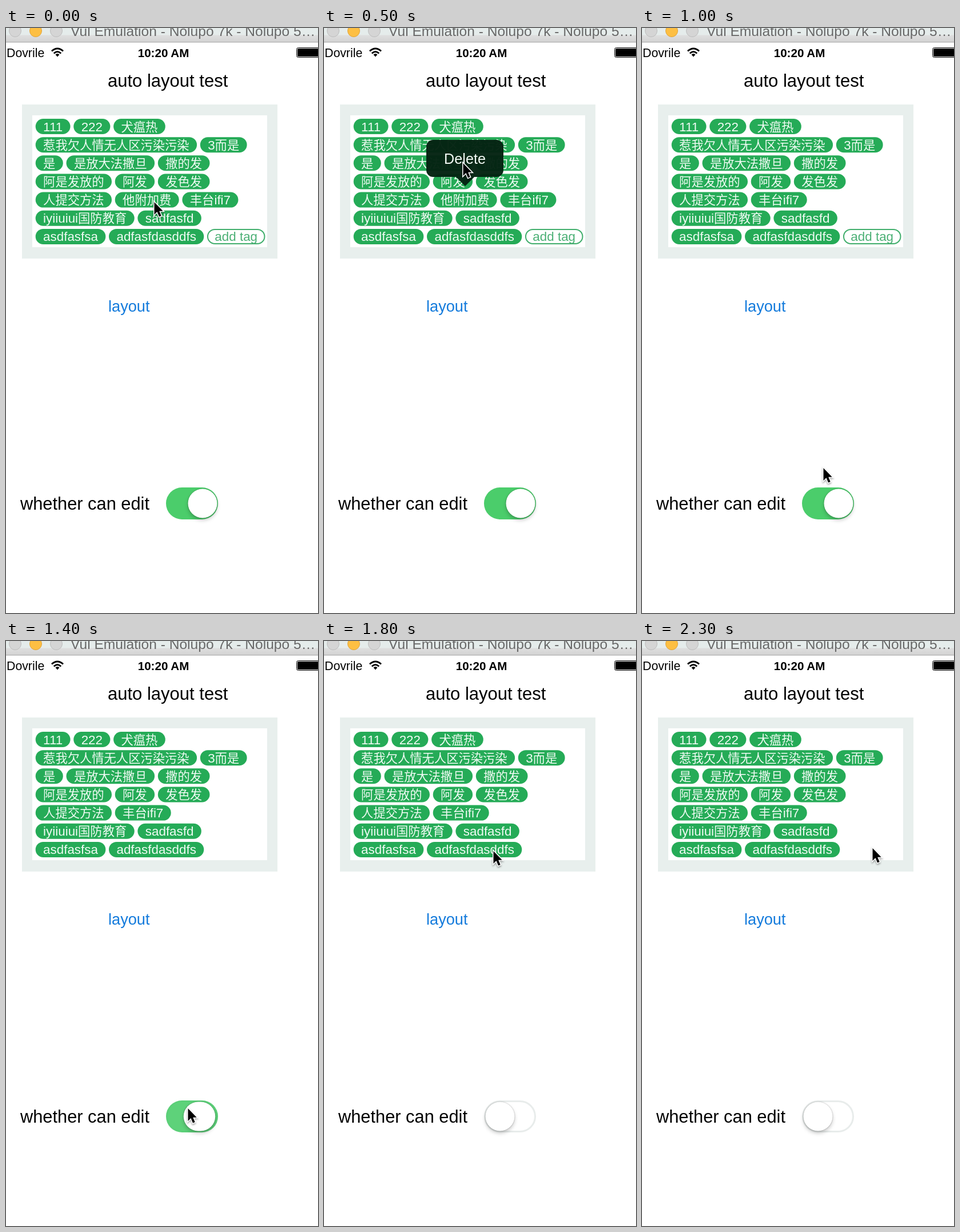
Recreate the animation shown at these times as an HTML page. Size 546x1025 px, loop 2.4 s.

```html
<!DOCTYPE html>
<html lang="en">
<head>
<meta charset="utf-8">
<title>Tag list</title>
<style>
  html, body { margin: 0; width: 100%; height: 100%; overflow: hidden; background: #fff; }
  svg { display: block; width: 546px; height: 1025px; font-family: "Liberation Sans", "Noto Sans CJK SC", "Noto Sans CJK", sans-serif; }
  .han { font-family: "Noto Sans CJK SC", "Noto Sans CJK", sans-serif; font-size: 21.3px; font-weight: 300; }
  #tags text { font-size: 22.4px; text-anchor: middle; fill: #effbf3; }
  #tags rect { fill: #25ab57; }
  #tags .add rect { fill: #fff; stroke: #41ae6c; stroke-width: 2; }
  #tags .add text { fill: #4bb075; }
  #knob { fill: #fff; filter: drop-shadow(0 0 1px rgba(0, 0, 0, .3)) drop-shadow(0 4px 3px rgba(0, 0, 0, .2)); }
  #cursor { stroke: #fff; stroke-width: 3; paint-order: stroke; filter: drop-shadow(0 2px 1.5px rgba(0, 0, 0, .35)); }
</style>
</head>
<body>
<svg viewBox="0 0 546 1025">
  <defs>
    <linearGradient id="bar" x2="0" y2="1">
      <stop offset=".48" stop-color="#e5eceb"/>
      <stop offset=".55" stop-color="#dedede"/>
      <stop offset="1" stop-color="#d3d3d3"/>
    </linearGradient>
  </defs>

  <rect width="546" height="24" fill="url(#bar)"/>
  <rect y="24" width="546" height="1.5" fill="#b6b6b6"/>
  <g fill="#d5d5d5" stroke="#bdbdbd">
    <circle cx="16" cy="5" r="10.5"/>
    <circle cx="52" cy="5" r="10.5" fill="#fdbf43" stroke="#e0a43a"/>
    <circle cx="88" cy="5" r="10.5"/>
  </g>
  <text x="113" y="14" font-size="24.6" fill="#686868">Vul Emulation - Nolupo 7k - Nolupo 5…</text>

  <text x="1" y="51" font-size="21.3">Dovrile</text>
  <path d="M80 40.5Q90 31.5 100 40.5M83.8 44.5Q90 38.5 96.2 44.5" fill="none" stroke="#000" stroke-width="3"/>
  <path d="M86.5 46.5Q90 43.5 93.5 46.5L90 50.5Z"/>
  <text x="275.5" y="51" font-size="20.6" font-weight="bold" text-anchor="middle">10:20 AM</text>
  <rect x="508.5" y="34.5" width="50" height="17" rx="3" fill="#fff" stroke="#000"/>
  <rect x="510" y="36" width="48" height="14" rx="1.5"/>

  <text x="178" y="103" font-size="31">auto layout test</text>
  <rect x="28" y="134" width="447" height="270" fill="#e8efed"/>
  <rect x="46" y="153" width="411" height="231" fill="#fff"/>
  <g id="tags"></g>
  <text x="179" y="497" font-size="27.2" fill="#147bdc">layout</text>
  <text x="25" y="844" font-size="30.8">whether can edit</text>

  <rect x="281.5" y="806.5" width="88" height="53" rx="26.5" fill="#fff" stroke="#e8eceb" stroke-width="3"/>
  <rect id="track" x="280" y="805" width="91" height="56" rx="28" fill="#4bcd6b"/>
  <rect id="knob" y="807.5" height="51" rx="25.5"/>

  <g id="popup">
    <path id="bubble" d="M191 196H302a12 12 0 0 1 12 12V249a12 12 0 0 1-12 12H263L247 277 231 261H191a12 12 0 0 1-12-12V208a12 12 0 0 1 12-12Z" fill-opacity=".97"/>
    <text x="246.5" y="238" font-size="25.2" text-anchor="middle" fill="#f4fbf6">Delete</text>
  </g>
  <path id="cursor" d="M.5 1V23L5.5 18 9 26.5 12.7 25 9.2 16.7H15.7Z"/>
</svg>

<script>
const DURATION = 2400, STEP = 100;
const TAG_HEIGHT = 27, TAG_PADDING = 26.8, TAG_GAP = 5.7, ROW_PITCH = 32.15;
const REMOVED = '他附加费', ADD = 'add tag';
const ROWS = [
  ['111', '222', '犬瘟热'],
  ['惹我欠人情无人区污染污染', '3而是'],
  ['是', '是放大法撒旦', '撒的发'],
  ['阿是发放的', '阿发', '发色发'],
  ['人提交方法', REMOVED, '丰台ifi7'],
  ['iyiiuiui国防教育', 'sadfasfd'],
  ['asdfasfsa', 'adfasfdasddfs', ADD]
];
// Cursor waypoints: time in ms, x, y.
const PATH = [
  [200, 259, 304], [500, 243, 236], [600, 243, 236], [800, 374, 525], [1000, 317, 770],
  [1200, 318, 818], [1500, 318, 818], [1800, 296, 367], [2300, 403, 362]
];

const $ = id => document.getElementById(id);
const lerp = (a, b, k) => a + (b - a) * k;
const ramp = (time, from, to) => Math.min(1, Math.max(0, (time - from) / (to - from)));
const smooth = k => k * k * (3 - 2 * k);

function setAttributes(element, values) {
  for (const name in values) element.setAttribute(name, values[name]);
}

function createTag(label) {
  const group = document.createElementNS('http://www.w3.org/2000/svg', 'g');
  const inset = label === ADD ? 1 : 0;
  group.classList.toggle('add', label === ADD);
  group.innerHTML = '<rect/><text y="21.5">' +
    label.replace(/[\u4e00-\u9fff]+/g, '<tspan class="han">$&</tspan>') + '</text>';
  $('tags').append(group);

  const [pill, text] = group.children;
  const width = text.getComputedTextLength() + TAG_PADDING;
  text.setAttribute('x', width / 2);
  setAttributes(pill, {
    x: inset, y: inset, rx: TAG_HEIGHT / 2 - inset,
    width: width - 2 * inset, height: TAG_HEIGHT - 2 * inset
  });
  return { label, group, width };
}

const tagRows = ROWS.map(row => row.map(createTag));

function layoutTags(hidden) {
  tagRows.forEach((row, r) => {
    let x = 51.7;
    for (const { label, group, width } of row) {
      const visible = !hidden.includes(label);
      group.style.display = visible ? '' : 'none';
      group.setAttribute('transform', `translate(${x} ${159 + r * ROW_PITCH})`);
      if (visible) x += width + TAG_GAP;
    }
  });
}

function cursorAt(time) {
  let [, x, y] = PATH[0];
  for (let i = 1; i < PATH.length; i++) {
    const k = ramp(time, PATH[i - 1][0], PATH[i][0]);
    x = lerp(x, PATH[i][1], k);
    y = lerp(y, PATH[i][2], k);
  }
  return [x, y];
}

function draw(time) {
  layoutTags([time >= 700 && REMOVED, time >= 1400 && ADD]);

  const fade = ramp(time, 600, 800);
  $('popup').style.display = time >= 300 && time < 900 ? '' : 'none';
  $('bubble').setAttribute('fill', `rgb(${lerp(5, 24, fade)}, ${lerp(36, 140, fade)}, ${lerp(18, 73, fade)})`);

  // The knob stretches while pressed, then relaxes as it slides off.
  const slide = smooth(ramp(time, 1350, 1600));
  const stretch = 5 * ramp(time, 1200, 1300) * (1 - slide);
  setAttributes($('knob'), { x: lerp(318.5 - stretch, 282.5, slide), width: 51 + stretch });
  $('track').setAttribute('opacity', 1 - slide);

  $('cursor').setAttribute('transform', `translate(${cursorAt(time)})`);
}

const start = performance.now();
function tick() {
  const elapsed = (performance.now() - start) % DURATION;
  draw(Math.floor(elapsed / STEP) * STEP);
  requestAnimationFrame(tick);
}
tick();
</script>
</body>
</html>
```
